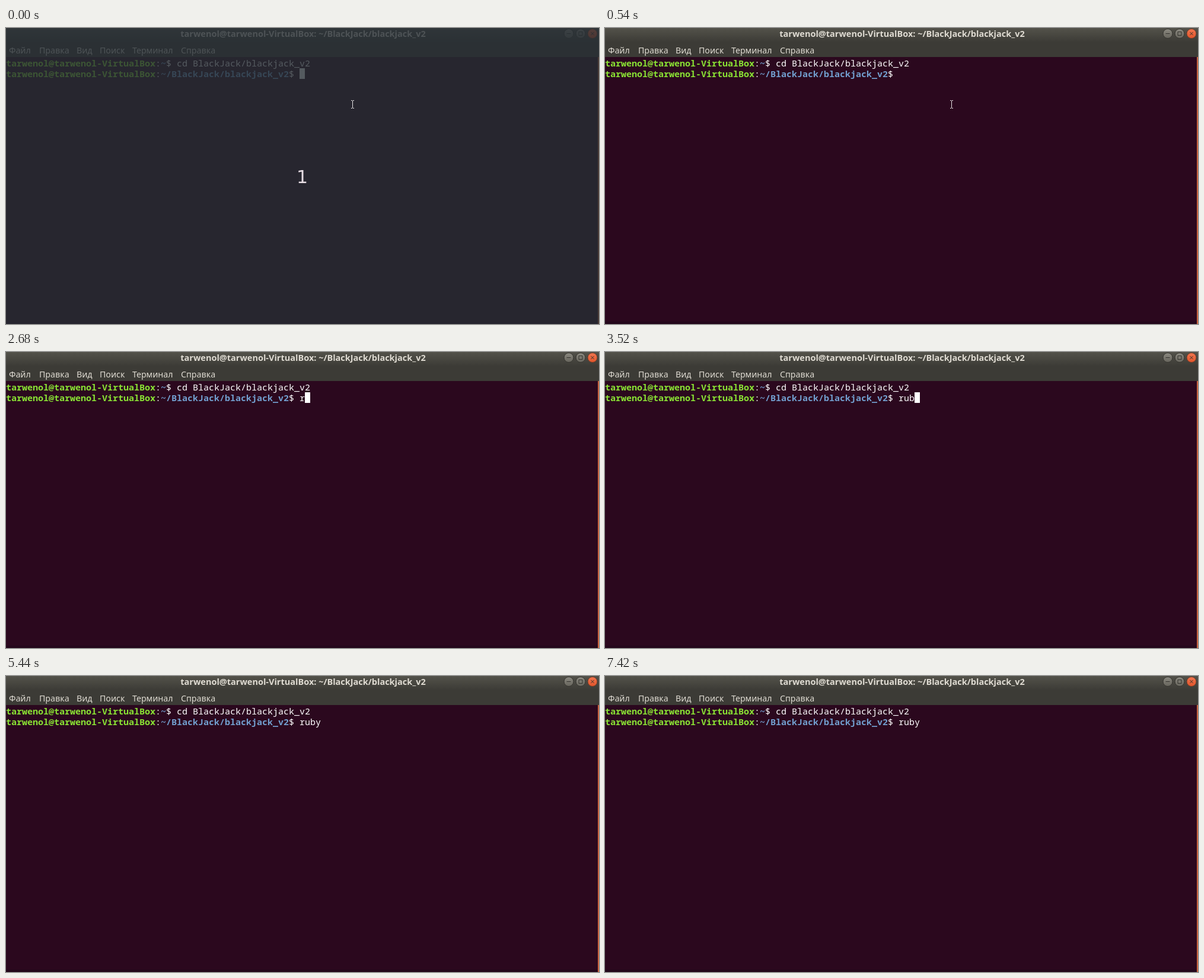
An HTML page that plays this animation: 1000x500 px, repeating every 8000 ms.

```html
<!DOCTYPE html>
<html lang="ru">
<head>
<meta charset="utf-8">
<title>Terminal</title>
<style>
  html, body { margin: 0; width: 100%; height: 100%; overflow: hidden; background: #2b081e; }
  svg { display: block; width: 1000px; height: 500px; }
  text { white-space: pre; }
  .title { font: 700 14.5px "Noto Sans", sans-serif; fill: #dfdbd2; text-anchor: middle; }
  .menu { font: 14.2px "Noto Sans", sans-serif; fill: #dfdbd2; }
  .term { font: 15px "Noto Sans Mono", monospace; fill: #fff; }
  .user { font-weight: 700; fill: #8ae234; }
  .path { font-weight: 700; fill: #729fcf; }
  .count { font: 30px "DejaVu Sans", sans-serif; fill: #e6dce3; text-anchor: middle; }
</style>
</head>
<body>
<svg viewBox="0 0 1000 500">
  <defs>
    <linearGradient id="bar" x2="0" y2="1">
      <stop offset="0" stop-color="#53524a"/>
      <stop offset="1" stop-color="#3c3b36"/>
    </linearGradient>
    <linearGradient id="grey" x2="0" y2="1">
      <stop offset="0" stop-color="#8b8980"/>
      <stop offset="1" stop-color="#66645c"/>
    </linearGradient>
    <linearGradient id="orange" x2="0" y2="1">
      <stop offset="0" stop-color="#f07650"/>
      <stop offset="1" stop-color="#e2552b"/>
    </linearGradient>
  </defs>

  <rect width="1000" height="500" fill="#2b081e"/>
  <rect y="496" width="1000" height="4" fill="#24071b"/>
  <rect x="998" y="49" width="2" height="451" fill="#c9633f"/>
  <rect width="1000" height="49" fill="#3c3b36"/>
  <rect width="1000" height="24" fill="url(#bar)"/>

  <text class="title" x="501" y="15">tarwenol@tarwenol-VirtualBox: ~/BlackJack/blackjack_v2</text>
  <g stroke="#33322d">
    <circle cx="949" cy="9.5" r="8" fill="url(#grey)"/>
    <circle cx="969" cy="9.5" r="8" fill="url(#grey)"/>
    <circle cx="989" cy="9.5" r="8" fill="url(#orange)" stroke="#6b3a28"/>
    <path d="M945.5 9.5h7M966 6.5h6v6h-6zM986.5 7l5 5m0-5l-5 5" fill="none"/>
  </g>
  <g id="menu" class="menu"></g>

  <g class="term">
    <text y="65"><tspan class="user">tarwenol@tarwenol-VirtualBox</tspan>:<tspan class="path">~</tspan>$ cd BlackJack/blackjack_v2</text>
    <text y="83"><tspan class="user">tarwenol@tarwenol-VirtualBox</tspan>:<tspan class="path">~/BlackJack/blackjack_v2</tspan>$ <tspan id="typed"></tspan></text>
  </g>
  <rect id="cursor" y="68" width="9" height="18" fill="#fff"/>

  <g id="countdown">
    <rect width="1000" height="500" fill="#272e34" fill-opacity=".79"/>
    <text class="count" x="499.5" y="262">1</text>
  </g>
  <path id="pointer" d="M582 122.5h2m1 0h2M584.5 123v12M582 135.5h2m1 0h2" stroke="#e8e4e6" fill="none"/>
</svg>
<script>
const LOOP = 8000, CELL = 9, INPUT_X = 495;
const COUNTDOWN_END = 280, POINTER_END = 2680;

// [start ms, typed text, cursor visible]
const STEPS = [
  [0, "", true],
  [540, "", false],
  [2120, "", true],
  [2680, "r", true],
  [2960, "ru", true],
  [3520, "rub", true],
  [4080, "ruby", true],
  [5440, "ruby", false],
  [6000, "ruby ", true],
  [7420, "ruby ", false],
];
const MENU = [[5, "Файл"], [56, "Правка"], [119, "Вид"], [158, "Поиск"], [213, "Терминал"], [295, "Справка"]];

const el = id => document.getElementById(id);
const show = (id, on) => el(id).setAttribute("visibility", on ? "visible" : "hidden");

for (const [x, label] of MENU) {
  const item = document.createElementNS("http://www.w3.org/2000/svg", "text");
  item.setAttribute("x", x);
  item.setAttribute("y", 43);
  item.textContent = label;
  el("menu").append(item);
}

function draw(t) {
  const [, typed, cursorOn] = STEPS.findLast(([start]) => start <= t);
  el("typed").textContent = typed;
  el("cursor").setAttribute("x", INPUT_X + typed.length * CELL);
  show("cursor", cursorOn);
  show("countdown", t < COUNTDOWN_END);
  show("pointer", t < POINTER_END);
}

const origin = performance.now();
function tick() {
  draw((performance.now() - origin) % LOOP);
  requestAnimationFrame(tick);
}
tick();
</script>
</body>
</html>
```
